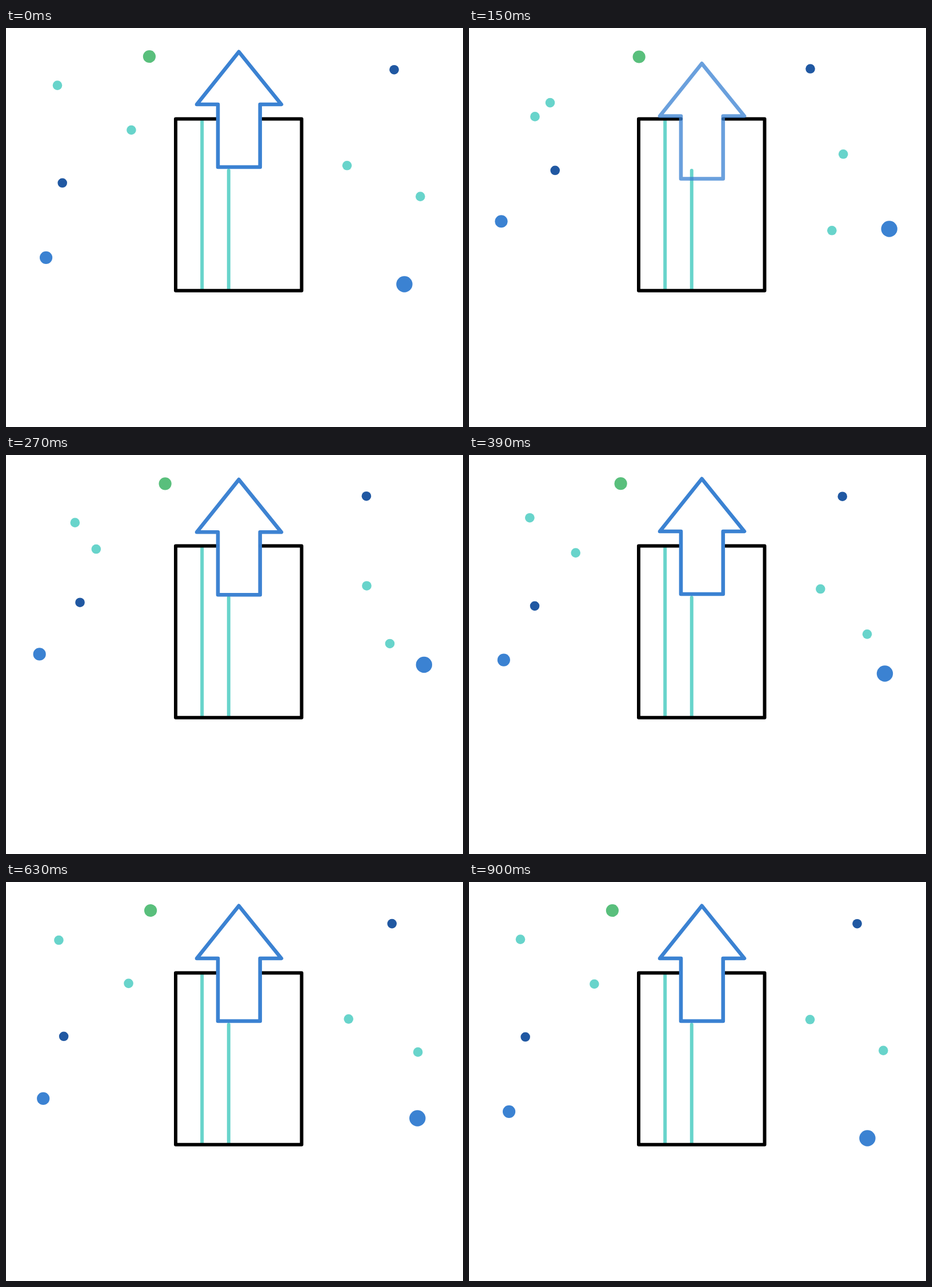
Recreate the animation shown at these times as an HTML page. Size 800 by 700 pixels, loop 0.93 s.

```html
<!DOCTYPE html>
<html lang="en">
<head>
<meta charset="utf-8">
<title>Upload</title>
<style>
  html, body { margin: 0; width: 100%; height: 100%; overflow: hidden; background: #fff; }
  svg { display: block; width: 100vw; height: 100vh; }
</style>
</head>
<body>
<svg viewBox="0 0 800 700" fill="none" stroke-linecap="round" stroke-linejoin="round">
  <g id="dots"></g>
  <path d="M343.2 162V458M389.8 250V458" stroke="#68d4cb" stroke-width="6"/>
  <path d="M371 159.5H297V460.8H517.5V159.5H445" stroke="#000" stroke-width="6"/>
  <path id="arrow" d="M407.6 41.8L482 134H444.8V244H371V134H334Z" stroke="#3b82d2" stroke-width="6.6"/>
</svg>
<script>
  const LOOP = 930, STEP = 30, START = 30, END = 900;
  const ARROW_MS = 320, ARROW_RISE = 84;
  const teal = '#68d4cb', navy = '#2058a2', blue = '#3b82d2', green = '#59bf7c';

  // Resting place, radius, colour, and total travel back to the launch point.
  const burst = [
    { x: 90, y: 100.6, r: 8.3, c: teal, dx: 81.2, dy: 47.6 },
    { x: 219.4, y: 179, r: 8.3, c: teal, dx: -162.2, dy: -36.8 },
    { x: 98.7, y: 271.8, r: 8.3, c: navy, dx: 81.2, dy: -34.4 },
    { x: 250.9, y: 50, r: 11.1, c: green, dx: 73, dy: 0.8 },
    { x: 679.5, y: 73.2, r: 8.3, c: navy, dx: -128, dy: -2.6 },
    { x: 597, y: 241.3, r: 8.3, c: teal, dx: 90.8, dy: -31.2 },
    { x: 725.3, y: 295.6, r: 8.3, c: teal, dx: -140.5, dy: 93.2 }
  ];
  // These drift at a steady speed; snap is the sideways jump on landing.
  const drift = [
    { x: 70.1, y: 402.8, r: 11.1, c: blue, dx: -15.8, dy: -73.7, snap: 0 },
    { x: 711.6, y: 449.5, r: 14.2, c: blue, dx: 27.9, dy: -112.6, snap: -14.2 }
  ];

  const arrow = document.getElementById('arrow');
  const layer = document.getElementById('dots');

  for (const d of [...burst, ...drift]) {
    d.el = document.createElementNS('http://www.w3.org/2000/svg', 'circle');
    d.el.setAttribute('r', d.r);
    d.el.setAttribute('fill', d.c);
    layer.append(d.el);
  }

  const clamp = v => Math.min(1, Math.max(0, v));

  function place(d, left, shift = 0) {
    d.el.setAttribute('cx', d.x + d.dx * left + shift);
    d.el.setAttribute('cy', d.y + d.dy * left);
  }

  function draw(ms) {
    const step = Math.floor((ms % LOOP) / STEP) * STEP;
    const t = step < START ? END : step;
    const left = clamp((END - t) / (END - START));
    burst.forEach(d => place(d, left ** 3));
    drift.forEach(d => place(d, left, left === 0 ? d.snap : 0));

    const sink = (1 - clamp((t - START) / ARROW_MS)) ** 3;
    arrow.setAttribute('transform', `translate(0 ${ARROW_RISE * sink})`);
    arrow.setAttribute('opacity', 1 - sink);
  }

  const t0 = performance.now();
  function tick() {
    draw(performance.now() - t0);
    requestAnimationFrame(tick);
  }
  tick();
</script>
</body>
</html>
```
